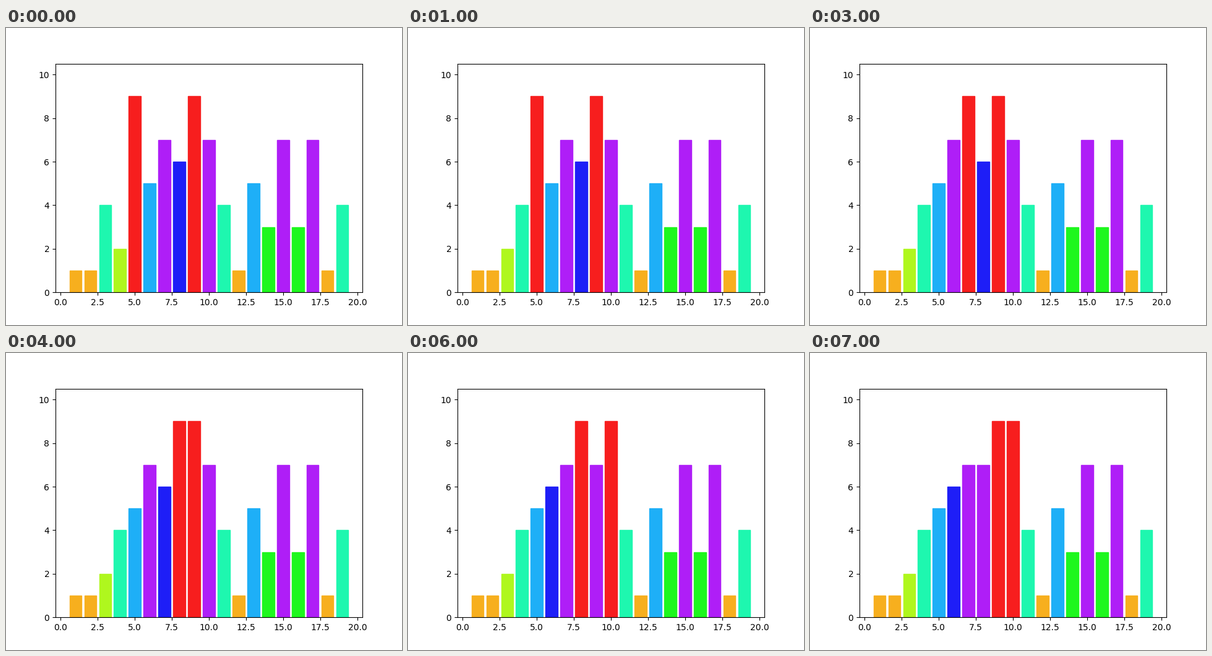
Write a matplotlib script that moves like this. It is 640 px wide and 480 px high and loops after 8 s.

```python
import colorsys

import matplotlib.pyplot as plt
from matplotlib.animation import FuncAnimation

START = [1, 1, 4, 2, 9, 5, 7, 6, 9, 7, 4, 1, 5, 3, 7, 3, 7, 1, 4]
STEP_MS = 1000
STEPS = 8


def insertion_states(values):
    """Yield the list before sorting and after every swap."""
    values = list(values)
    yield list(values)
    for i in range(1, len(values)):
        j = i
        while j > 0 and values[j - 1] > values[j]:
            values[j - 1], values[j] = values[j], values[j - 1]
            yield list(values)
            j -= 1


def bar_color(value):
    return colorsys.hsv_to_rgb(value / 9 % 1, 0.88, 0.97)


states = list(insertion_states(START))[:STEPS]

fig, ax = plt.subplots(figsize=(6.4, 4.8), dpi=100)
bars = ax.bar(range(1, len(START) + 1), START, linewidth=1)
ax.set_ylim(0, 10.5)


def draw(step):
    for bar, value in zip(bars, states[step]):
        bar.set_height(value)
        bar.set_color(bar_color(value))
    return bars


anim = FuncAnimation(fig, draw, frames=STEPS, init_func=lambda: draw(0),
                     interval=STEP_MS, repeat=True, repeat_delay=0)
plt.show()
```
